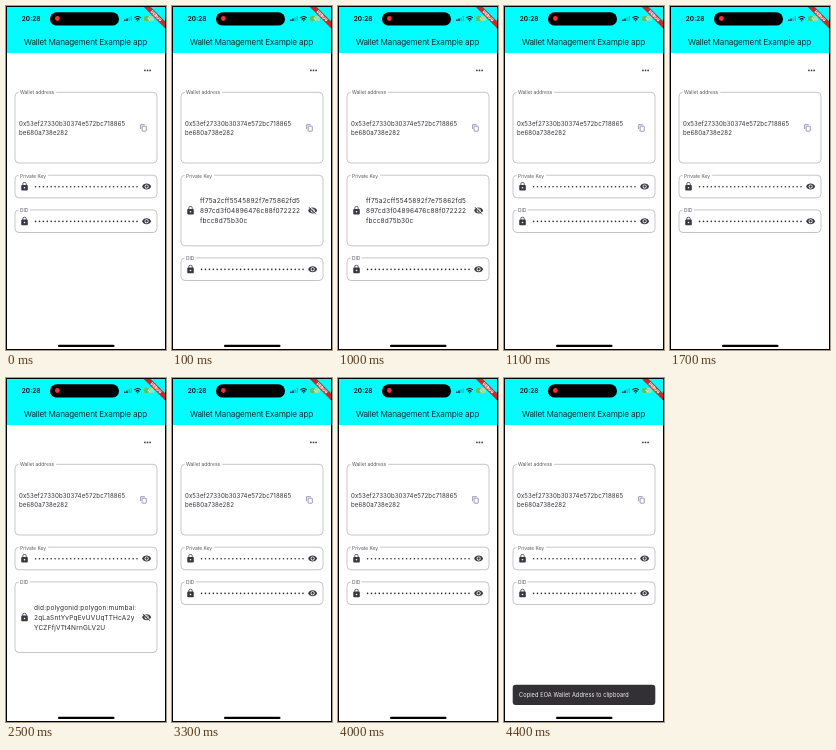
Animation of 160 by 344 pixels, one loop 4600 ms. Source, as an HTML page:

```html
<!DOCTYPE html>
<html lang="en">
<head>
<meta charset="utf-8">
<title>Wallet Management Example app</title>
<style>
  html, body { margin: 0; width: 100%; height: 100%; overflow: hidden; background: #fff; }
  svg { display: block; width: 100vw; height: 100vh; font-family: Inter, Roboto, sans-serif; }
  .outline { fill: none; stroke: #8d8992; stroke-width: .5; }
  .label { font-size: 4.92px; fill: #5a5660; }
  .address { font-size: 6.1px; letter-spacing: .1px; fill: #333138; }
  .secret { font-size: 6.5px; letter-spacing: .2px; fill: #2c2a30; }
  .icon { fill: #3a3742; }
  .bullets { fill: none; stroke: #2c2a30; stroke-width: 1.6; stroke-linecap: round; stroke-dasharray: 0 3.9; }
</style>
</head>
<body>
<svg viewBox="0 0 160 344" preserveAspectRatio="none">
  <defs>
    <path id="lock" d="M18 8h-1V6c0-2.76-2.24-5-5-5S7 3.24 7 6v2H6c-1.1 0-2 .9-2 2v10c0 1.1.9 2 2 2h12c1.1 0 2-.9 2-2V10c0-1.1-.9-2-2-2zm-6 9c-1.1 0-2-.9-2-2s.9-2 2-2 2 .9 2 2-.9 2-2 2zm3.1-9H8.9V6c0-1.71 1.39-3.1 3.1-3.1s3.1 1.39 3.1 3.1v2z"/>
    <path id="eye" d="M12 4.5C7 4.5 2.73 7.61 1 12c1.73 4.39 6 7.5 11 7.5s9.27-3.11 11-7.5c-1.73-4.39-6-7.5-11-7.5zM12 17c-2.76 0-5-2.24-5-5s2.24-5 5-5 5 2.24 5 5-2.24 5-5 5zm0-8c-1.66 0-3 1.34-3 3s1.34 3 3 3 3-1.34 3-3-1.34-3-3-3z"/>
    <g id="eyeOff">
      <use href="#eye"/>
      <path d="M4.5 2.2 22.3 20" stroke="#fff" stroke-width="2.2"/>
      <path d="M2.7 3.6 20.4 21.3" stroke="#3a3742" stroke-width="1.9"/>
    </g>
  </defs>

  <rect width="160" height="344" fill="#fff"/>
  <rect width="160" height="47" fill="#00fdff"/>

  <text x="15.8" y="14.8" font-size="6.5" font-weight="600">20:28</text>
  <rect x="44" y="6.2" width="69" height="13.4" rx="6.7"/>
  <circle cx="51.4" cy="12.5" r="2.4" fill="#f5303a"/>
  <g stroke="#000" stroke-width="1.2">
    <path d="M118.9 15v-1.6M121 15v-2.6"/>
    <path d="M123.1 15v-3.7M125.2 15v-4.9" stroke-opacity=".25"/>
  </g>
  <path d="M128.4 11.9q3.2-2.7 6.4 0M129.7 13.4q1.9-1.6 3.8 0" fill="none" stroke="#000" stroke-width="1.1"/>
  <circle cx="131.6" cy="14.7" r=".8"/>
  <rect x="138" y="9.9" width="10" height="5.2" rx="1.6" fill="#8fe3b4"/>
  <rect x="138" y="9.9" width="6" height="5.2" rx="1.6" fill="#4cc96a"/>
  <path d="M143.6 10.4l-1.7 2.5h2l-.8 1.8" fill="none" stroke="#fff" stroke-width=".7"/>

  <g transform="translate(160 0) rotate(45)">
    <rect x="-16.4" y="11.5" width="32.8" height="4.9" fill="#c22a30"/>
    <text y="15.4" font-size="4" font-weight="900" fill="#fff" text-anchor="middle">DEBUG</text>
  </g>

  <text x="18" y="38.7" font-size="8.2" letter-spacing="-.2" fill="#14282a">Wallet Management Example app</text>

  <g fill="#3a3742">
    <circle cx="138.9" cy="64.4" r=".85"/><circle cx="141.5" cy="64.4" r=".85"/><circle cx="144.1" cy="64.4" r=".85"/>
  </g>

  <rect class="outline" x="9" y="86.3" width="142" height="70.7" rx="4"/>
  <rect x="12.7" y="83" width="37.5" height="6" fill="#fff"/>
  <text class="label" x="14" y="88.3">Wallet address</text>
  <text class="address"><tspan x="13" y="119.6">0x53ef27330b30374e572bc718865</tspan><tspan x="13" y="129.2">be680a738e282</tspan></text>
  <g fill="none" stroke="#7977ae" stroke-width=".75">
    <path d="M134.6 123v-4.3h4.2"/>
    <rect x="136.1" y="120.2" width="4.2" height="5" rx=".5"/>
  </g>

  <g id="fields"></g>

  <g id="snackbar">
    <rect x="8.7" y="306.7" width="142.6" height="20.2" rx="3" fill="#322f35"/>
    <text x="15" y="318.8" font-size="5.6" letter-spacing=".1" fill="#f5eff7">Copied EOA Wallet Address to clipboard</text>
  </g>

  <rect x="52" y="338.7" width="56.5" height="2.3" rx="1.1"/>
  <rect x=".5" y=".5" width="159" height="343" fill="none" stroke="#000"/>
</svg>
<script>
  const LOOP = 4600;
  const CLOSED_HEIGHT = 22.6, GROWTH = 48;
  const KEY_TOP = 169.2, DID_TOP = 203.9;
  const keyLines = ['ff75a2cff5545892f7e75862fd5', '897cd3f04896476c88f072222', 'fbcc8d75b30c'];
  const didLines = ['did:polygonid:polygon:mumbai:', '2qLaSntYvPqEvUVUqTTHcA2y', 'YCZFfjVTt4NrnGLV2U'];

  const fields = document.getElementById('fields');
  const snackbar = document.getElementById('snackbar');

  const icon = (id, x, y) =>
    `<use class="icon" href="#${id}" transform="translate(${x - 4.9} ${y - 4.9}) scale(.41)"/>`;

  function field(label, labelWidth, top, lines, open) {
    const height = CLOSED_HEIGHT + (open ? GROWTH : 0);
    const middle = top + height / 2;
    const content = open
      ? lines.map((line, i) => `<text class="secret" x="28" y="${middle + 2.5 + (i - 1) * 9.85}">${line}</text>`).join('')
      : `<path class="bullets" d="M29.6 ${middle + .2}H131.2"/>`;
    return `<rect class="outline" x="9" y="${top}" width="142" height="${height}" rx="4"/>
      <rect x="12.7" y="${top - 3}" width="${labelWidth}" height="6" fill="#fff"/>
      <text class="label" x="14" y="${top + 2.3}">${label}</text>
      ${icon('lock', 18.5, middle)}${content}${icon(open ? 'eyeOff' : 'eye', 140.6, middle)}`;
  }

  let shown = '';
  function render(time) {
    const keyOpen = time >= 100 && time < 1100;
    const didOpen = time >= 2000 && time < 3300;
    const state = `${keyOpen} ${didOpen}`;
    if (state !== shown) {
      shown = state;
      fields.innerHTML =
        field('Private Key', 29.5, KEY_TOP, keyLines, keyOpen) +
        field('DID', 10.8, DID_TOP + (keyOpen ? GROWTH : 0), didLines, didOpen);
    }
    snackbar.setAttribute('visibility', time >= 4400 ? 'visible' : 'hidden');
  }

  const start = performance.now();
  function tick() {
    render((performance.now() - start) % LOOP);
    requestAnimationFrame(tick);
  }
  tick();
</script>
</body>
</html>
```
